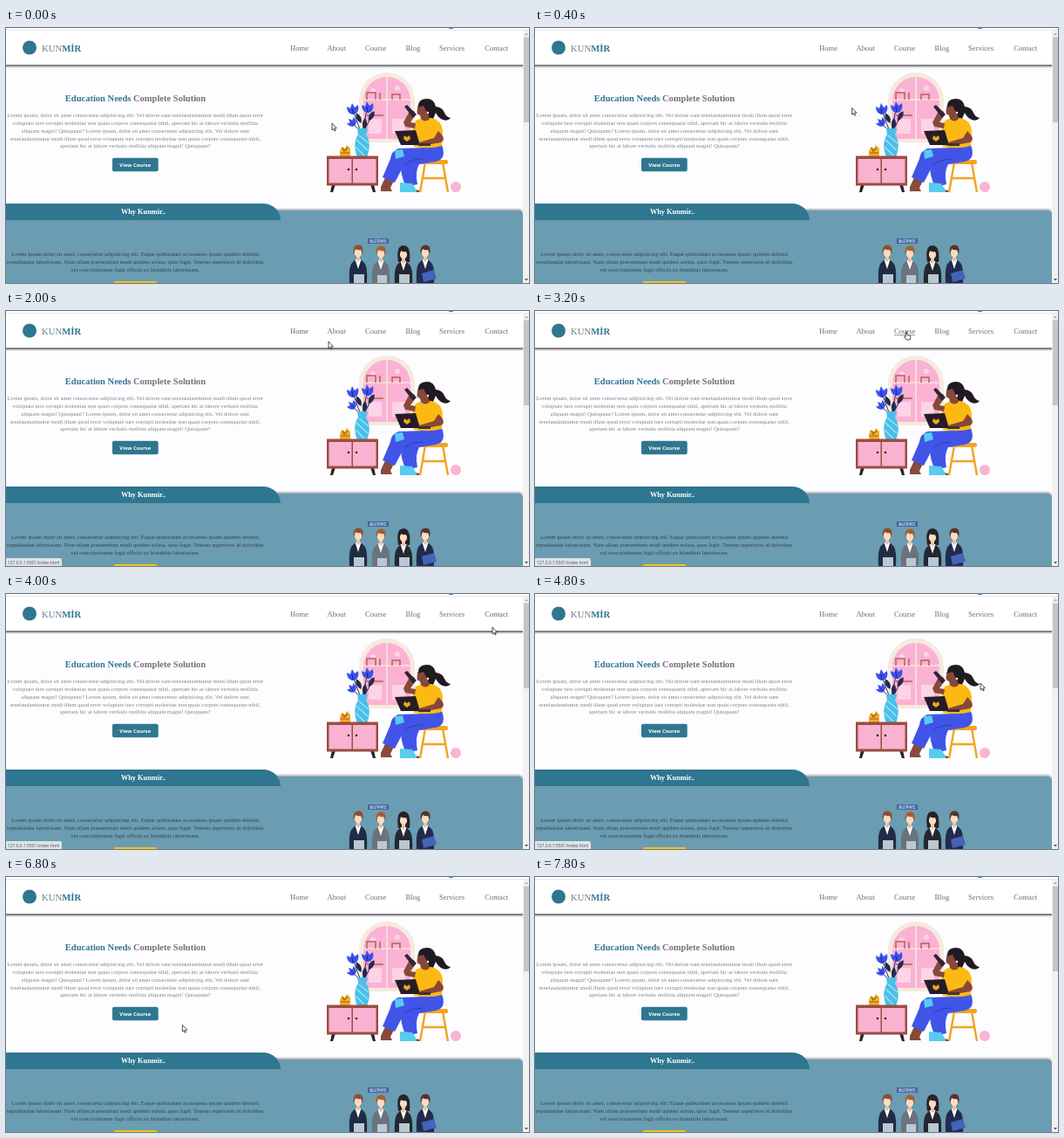
Recreate the animation shown at these times as an HTML page. Size 600 by 292 pixels, loop 8000 ms.

```html
<!DOCTYPE html>
<html lang="en">
<head>
<meta charset="utf-8">
<title>Course landing page</title>
<style>
  html, body { margin: 0; width: 100%; height: 100%; overflow: hidden; background: #fdfcfe; }
  svg { display: block; width: 100vw; height: 100vh; }
  text { font-family: "Liberation Serif", serif; }
  .mid { text-anchor: middle; }
  .nav text { font-size: 8.65px; fill: #6e6e74; }
  .nav rect { fill: #77858c; visibility: hidden; }
  .nav .warm text { fill: #536b77; }
  .nav .hover rect { visibility: visible; }
  .copy { font-size: 6.5px; text-anchor: middle; }
  .bold { font-weight: bold; }
  .sans { font-family: "Open Sans", sans-serif; }
  #button { fill: #2f7690; }
  #button.hover { fill: #4a89a4; }
  .panel { filter: drop-shadow(0 -.8px 1.5px rgba(30, 30, 40, .55)); }
  #arrow, #hand { fill: #fff; stroke: #222; stroke-width: .8; stroke-linejoin: round; }
</style>
</head>
<body>
<svg viewBox="0 0 600 292">
  <defs>
    <linearGradient id="shade" x2="0" y2="1">
      <stop offset="0" stop-color="#77777c"/>
      <stop offset=".3" stop-color="#77777c"/>
      <stop offset=".6" stop-color="#c9c9cd"/>
      <stop offset="1" stop-color="#fdfcfe"/>
    </linearGradient>
    <g id="flower">
      <path d="M-1 6Q-7 4-7-3L-3-1-1-7 2-2 6-5Q8 4 1 6Z" fill="#3a50ec"/>
      <path d="M0 5-1-1" stroke="#20256f"/>
    </g>
    <path id="leaf" d="M0 7Q-5 0 1-6 6 1 0 7Z" fill="#252a4d"/>
    <!-- Suit uses the text colour, hair the inherited fill -->
    <g id="worker">
      <path d="M-10 36Q-11 17-7 13L-3 9H3L7 13Q11 17 10 36Z" fill="currentColor"/>
      <path d="M-3.500 9 0 20 3.500 9Z" fill="#fff"/>
      <path d="M-2 5H2V10L0 12-2 10Z" fill="#eebf9f"/>
      <ellipse rx="4.200" ry="5.400" cy="1" fill="#fbdcc3"/>
      <path d="M-5 3Q-7-8 1-7.500 7-7 5 3L3-2Q0-1-3-3Z"/>
    </g>
  </defs>

  <!-- Header -->
  <rect width="600" height="42" fill="#fff"/>
  <rect y="2" width="600" height=".7" fill="#dedee2"/>
  <rect x="508" width="5" height="1" fill="#3f7fe0"/>
  <rect y="42" width="593" height="4" fill="url(#shade)"/>
  <circle cx="27" cy="22.500" r="8" fill="#2f7690"/>
  <text x="41" y="26.500" font-size="10.700" fill="#6d7d85">KUN<tspan class="bold" fill="#2f7690">MİR</tspan></text>
  <g class="nav" id="nav"></g>

  <!-- Hero copy -->
  <text class="mid bold" x="148.500" y="84" font-size="10.500" fill="#727277"><tspan fill="#2f7690">Education Needs</tspan> Complete Solution</text>
  <g class="copy" id="intro" fill="#85858b"></g>
  <rect id="button" x="122" y="148.800" width="52.700" height="15.500" rx="2"/>
  <text class="mid sans bold" x="148.300" y="158.700" font-size="5.900" fill="#fff">View Course</text>

  <!-- Window -->
  <path d="M405 131V83A32 32 0 0 1 469 83V131Z" fill="#f5eadd"/>
  <path d="M410 127V83A27 27 0 0 1 464 83V127Z" fill="#fbb1d3"/>
  <path d="M437 56V128M410 82H464" stroke="#f5eadd" stroke-width="1.500"/>
  <g fill="#fdd3e6"><circle cx="421" cy="72" r="3"/><circle cx="449" cy="69" r="3"/><path d="M416 104H431V121H416ZM443 104H458V121H443Z"/></g>
  <path d="M414 82V74H424V82M414 100H433M429 82V74M443 82V76H452V82" fill="none" stroke="#b86157" stroke-width="1.500"/>

  <!-- Vase and sideboard -->
  <path d="M407 119 398 94M409 118 414 94M408 119 398 110M410 119 419 102" fill="none" stroke="#25305c"/>
  <use href="#leaf" x="411" y="109"/>
  <use href="#leaf" transform="translate(419 100) rotate(28)"/>
  <use href="#leaf" transform="translate(404 103) rotate(-30)"/>
  <use href="#flower" x="398" y="93"/>
  <use href="#flower" x="415" y="91"/>
  <use href="#flower" transform="translate(397 108) rotate(-35) scale(.8)"/>
  <path d="M403 115H415L413 122Q420 132 414 148H403Q397 132 404 122Z" fill="#49bfe9"/>
  <path d="M402 128 415 140M401 136 411 146M405 123 416 132" stroke="#a6e5f7" stroke-width="1.200"/>
  <path d="M383 141 385 136 389 138 391 134 395 138V148H383Z" fill="#f2b01f"/>
  <path d="M386 137 388 141 392 137M384 143H394" fill="none" stroke="#9c572d" stroke-width="1.200"/>
  <path d="M374 179 372 188H375L378 179M418 179 421 188H424L422 179" fill="#2b2022"/>
  <rect x="368" y="146.500" width="59" height="34" fill="#9b4d43"/>
  <path d="M370.500 150H396.500V177.500H370.500ZM398 150H424.500V177.500H398Z" fill="#f9b3d0"/>
  <circle cx="393" cy="162" r="1.300" fill="#2b2022"/><circle cx="402" cy="162" r="1.300" fill="#2b2022"/>

  <!-- Stool and reader -->
  <path d="M481 154 475 188M501 154 507 188M478 172H504" stroke="#f2a41f" stroke-width="2.400"/>
  <rect x="474" y="151" width="33" height="5" rx="2" fill="#f2a41f"/>
  <circle cx="516" cy="182" r="6" fill="#f9b3d3"/>
  <path d="M439 163 430 182V187H443L441 183 449 167ZM461 174 465 184 474 186V188H460Z" fill="#874a3b"/>
  <g fill="#4154e8">
    <path d="M500 134Q506 150 493 153L474 156Q469 164 472 179L459 182Q450 163 455 150 462 139 480 137Z"/>
    <path d="M480 137 450 138Q442 141 441 150L432 171 446 177 457 156 478 153Z"/>
  </g>
  <path d="M457 157Q463 150 478 150" fill="none" stroke="#2937a6" stroke-width=".8"/>
  <path d="M446 140 455 139 457 147 447 150ZM452 177 466 178 471 186V188H452Z" fill="#58cbee"/>
  <path d="M473 88Q474 81 483 81 491 81 493 90 501 91 503 97 505 102 510 103 507 107 501 105 496 103 493 97L490 104 481 106Z" fill="#211a20"/>
  <path d="M470 106Q479 101 488 103 499 105 501 117L500 135Q486 139 468 136L466 118Z" fill="#fdb913"/>
  <path d="M473 89Q479 84 484 90L484 98 486 104Q481 109 476 104L475 100Q469 99 473 89Z" fill="#87483a"/>
  <path d="M472 91Q475 83 484 86L488 99 482 95 479 89Z" fill="#211a20"/>
  <circle cx="484" cy="97" r="1.200" fill="#fff"/>
  <path d="M469 115 458 113 456 108 462 97 468 95 470 99 464 108 470 109Z" fill="#87483a"/>
  <path d="M457 90 460 88 471 99 467 103Z" fill="#302437"/>
  <path d="M496 118Q506 127 499 131L477 135 474 131 491 126Z" fill="#87483a"/>
  <path d="M446 118 470 117 475 134H453Z" fill="#241d27"/>
  <path d="M473 132H487V135H473Z" fill="#3b313c"/>
  <path d="M457 123 460 125 463 123 464 127 460 130 456 127Z" fill="#f2a41f"/>

  <!-- Reasons section -->
  <rect class="panel" x="-10" y="209" width="603" height="100" rx="5" fill="#6a9cb2"/>
  <path d="M0 201H295A20 19 0 0 1 315 220H0Z" fill="#2f7690"/>
  <text class="mid bold" x="157.500" y="213.300" font-size="8.300" fill="#fff">Why Kunmir..</text>
  <g class="copy" id="reasons" fill="#34434a"></g>
  <rect x="124" y="290" width="49" height="4" rx="1" fill="#f2c11b"/>

  <rect x="415" y="241" width="24" height="6" fill="#3f629f"/>
  <text class="mid" x="427" y="245.600" style="font:4px 'Noto Sans CJK TC','Noto Sans CJK SC','Noto Sans CJK',sans-serif" fill="#fff">面試等候區</text>
  <use href="#worker" x="404" y="256" fill="#8a5030" color="#202c42"/>
  <use href="#worker" x="430" y="257" fill="#a3602f" color="#6b737c"/>
  <path d="M450 268Q447 249 456 249 465 249 463 268Z" fill="#26222a"/>
  <use href="#worker" x="456" y="258" fill="#26222a" color="#25272e"/>
  <use href="#worker" x="481" y="256" fill="#56342f" color="#222b4e"/>
  <g fill="#b9c8d2">
    <path d="M399 282H411V292H399ZM426 283H437V292H426ZM451 282H463V292H451Z"/>
    <path d="M477 281 491 277 494 287 479 291Z" fill="#4563b8"/>
  </g>

  <!-- Scrollbar -->
  <rect x="593" y="3" width="7" height="289" fill="#f1f1f2"/>
  <rect x="594" y="10.500" width="6" height="97.500" fill="#c5c5c7"/>
  <path d="M595 8 597 5.500 599 8Z" fill="#aaa"/>
  <path d="M595 287 597 289.500 599 287Z" fill="#555"/>

  <g id="status">
    <path d="M0 283H62Q64 283 64 285V292H0Z" fill="#dfe4e8"/>
    <text class="sans" x="2" y="289.700" font-size="4.900" fill="#4b5157">127.0.0.1:5501/index.html</text>
  </g>

  <g id="cursor">
    <path id="arrow" d="M0 0V7.800L1.700 6.200 2.900 9 4.200 8.400 3 5.800H5.400Z"/>
    <path id="hand" d="M-.7 4.500V.5Q0-.7 .7 .5V3.600L4 4.500Q5 5 4.700 7L4 9.500H.2L-2.500 6Q-2.200 4.500-.7 6Z"/>
  </g>
</svg>
<script>
  const LOOP = 8000, STEP = 200;
  const $ = id => document.getElementById(id);

  const intro = [
    "Lorem ipsum, dolor sit amet consectetur adipisicing elit. Vel dolore sunt tenelaudantiuntur modi illum quod error",
    "voluptate iure corrupti molestiae non quais corpors consequatur nihil, aperiam hic at labore veritatis mollitia",
    "aliquam magni! Quisquam? Lorem ipsum, dolor sit amet consectetur adipisicing elit. Vel dolore sunt",
    "tenelaudantiuntur modi illum quod error voluptate iure corrupti molestiae non quais corpors consequatur nihil,",
    "aperiam hic at labore veritatis mollitia aliquam magni! Quisquam?"
  ];
  const reasons = [
    "Lorem ipsum dolor sit amet, consectetur adipisicing elit. Eaque quibusdam accusamus ipsam quidem deleniti",
    "repudiandae laboriosam. Nam ullam praesentium modi quidem soluta, quos fugit. Tenetur asperiores id doloribus",
    "vel exercitationem fugit officiis ex blanditiis laboriosam."
  ];
  const fillLines = (id, lines, top) => $(id).innerHTML = lines.map((line, i) =>
    `<text x="148.300" y="${top + i * 8.75}">${line}</text>`).join("");
  fillLines("intro", intro, 102.3);
  fillLines("reasons", reasons, 261.2);

  const links = [["Home", 326, 346], ["About", 368.5, 390], ["Course", 412, 436],
    ["Blog", 458.5, 475], ["Services", 497, 527], ["Contact", 549.3, 576]]
    .map(([label, left, right]) => ({ label, left, right, top: 17, bottom: 29 }));
  $("nav").innerHTML = links.map(l =>
    `<g><text x="${l.left}" y="25.600">${l.label}</text>
     <rect x="${l.left}" y="27.300" width="${l.right - l.left}" height=".8"/></g>`).join("");
  links.forEach((l, i) => l.node = $("nav").children[i]);
  const button = { left: 122, right: 175, top: 149, bottom: 165 };

  // Pointer path: time, x, y
  const path = [
    [0, 374, 109], [200, 373, 107], [800, 345, 60], [1200, 331, 36.5], [1400, 334, 24],
    [1800, 343, 25], [2000, 370, 35], [2200, 376, 24], [2600, 384, 24], [2800, 402, 27],
    [3000, 420, 24], [3200, 426, 23.5], [3400, 508, 24], [3600, 558, 24], [3800, 564, 25],
    [4000, 558, 38], [4400, 528, 85], [4800, 511, 102], [5000, 490, 106], [5400, 320, 140],
    [5800, 160, 160], [6000, 152, 163.5], [6400, 153, 162], [7000, 227, 173], [7200, 227, 173],
    [7400, 340, 118], [7600, 582, 14], [7800, 620, 10], [LOOP, 620, 10]
  ];

  function pointerAt(time) {
    const i = Math.max(1, path.findIndex(p => p[0] >= time));
    const [t0, x0, y0] = path[i - 1], [t1, x1, y1] = path[i];
    const k = (time - t0) / (t1 - t0);
    return { x: x0 + (x1 - x0) * k, y: y0 + (y1 - y0) * k };
  }
  const inside = (p, box) =>
    p.x >= box.left && p.x <= box.right && p.y >= box.top && p.y <= box.bottom;
  const show = (id, on) => $(id).style.visibility = on ? "visible" : "hidden";

  function draw(now) {
    const time = Math.floor(now % LOOP / STEP) * STEP;
    const p = pointerAt(time), before = pointerAt(Math.max(0, time - STEP));
    let pointing = inside(p, button);
    $("button").classList.toggle("hover", pointing);
    for (const link of links) {
      const over = inside(p, link);
      link.node.classList.toggle("hover", over);
      link.node.classList.toggle("warm", over || inside(before, link));
      pointing ||= over;
    }
    $("cursor").setAttribute("transform", `translate(${p.x} ${p.y})`);
    show("hand", pointing);
    show("arrow", !pointing);
    show("status", time >= 1400 && time < 5000);
  }

  const start = performance.now();
  function tick() {
    draw(performance.now() - start);
    requestAnimationFrame(tick);
  }
  tick();
</script>
</body>
</html>
```
